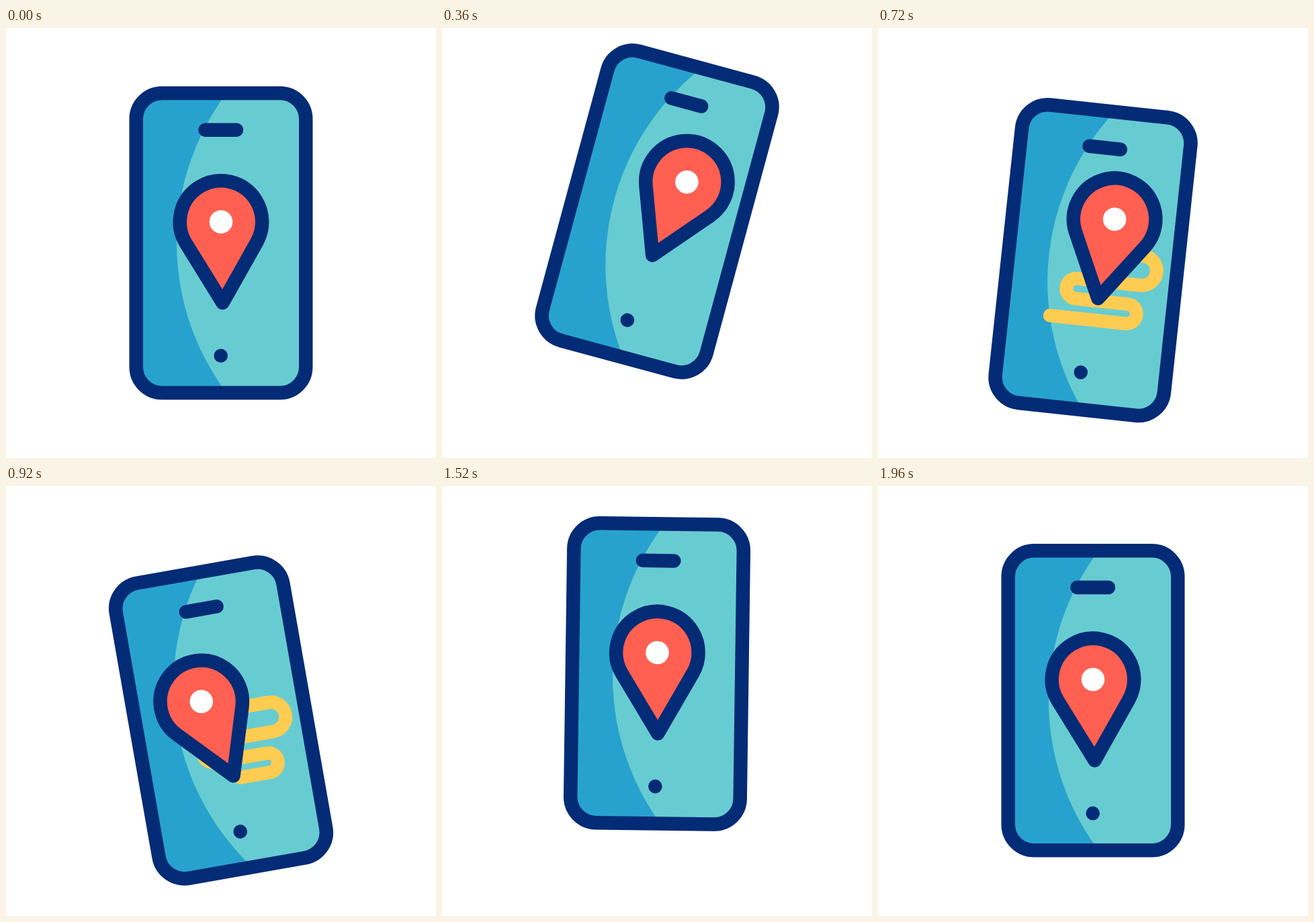
An HTML page with a canvas for the animation above (2000 ms loop, 640 px wide and 640 px high).

```html
<!DOCTYPE html>
<html lang="en">
<head>
<meta charset="utf-8">
<title>Phone with map pin</title>
<style>
html, body { margin: 0; width: 100%; height: 100%; overflow: hidden; background: #fff; }
canvas { display: block; width: 640px; height: 640px; }
</style>
</head>
<body>
<canvas id="stage" width="640" height="640"></canvas>
<script>
const ctx = document.getElementById('stage').getContext('2d');
const NAVY = '#042b76', BLUE = '#27a2ce', TEAL = '#67ccd1';
const RED = '#ff6051', YELLOW = '#ffcc52';
const LOOP = 2000, STEP = 40, LINE = 20.5, TAU = Math.PI * 2;

// Tracks are lists of [ms, value], eased in and out between keys.
const phoneTurn = [[0, 0], [530, 20], [930, -10], [1283, 5], [1600, 0]];
const phoneY = [[0, 320], [313, 272.5], [340, 272.5], [800, 352], [857, 352],
  [1381, 277], [1440, 277], [2000, 320]];
const pinTurn = [[200, 0], [530, 23.5], [930, -12.3], [1220, 9], [1520, 0]];
const pinHop = [[200, 0], [530, 1], [1010, 0]];
const routeHead = [[372, 0], [772, 1]];
const routeTail = [[840, 0], [1200, 1]];

function at(track, t) {
  if (t <= track[0][0]) return track[0][1];
  for (let i = 1; i < track.length; i++) {
    const [t0, a] = track[i - 1], [t1, b] = track[i];
    if (t < t1) {
      const u = (t - t0) / (t1 - t0);
      return a + (b - a) * u * u * (3 - 2 * u);
    }
  }
  return track[track.length - 1][1];
}

const rad = deg => deg * Math.PI / 180;

function disc(x, y, r, color) {
  ctx.beginPath();
  ctx.arc(x, y, r, 0, TAU);
  ctx.fillStyle = color;
  ctx.fill();
}

function stroke(color, width) {
  ctx.strokeStyle = color;
  ctx.lineWidth = width;
  ctx.stroke();
}

function body() {
  ctx.beginPath();
  ctx.roundRect(-126.25, -223, 252.5, 446, 38.5);
}

function screen() {
  ctx.save();
  body();
  ctx.fillStyle = BLUE;
  ctx.fill();
  ctx.clip();
  disc(306, 0, 372, TEAL);
  ctx.restore();
}

// Winding road: bottom line, small bend, left bend, large bend, top line.
const road = { startX: -55, bend1: 58.5, left: -20, bend2: 74, endX: -20 };
const R1 = 14.5, R2 = 15, R3 = 22, BASE = 88.6;
const roadLength = (road.bend1 - road.startX) + (road.bend1 - road.left) +
  (road.bend2 - road.left) + (road.bend2 - road.endX) + Math.PI * (R1 + R2 + R3);

function route(t) {
  const from = at(routeTail, t) * roadLength;
  const to = at(routeHead, t) * roadLength;
  if (to - from < 0.5) return;
  const y1 = BASE - R1, y2 = y1 - R1 - R2, y3 = y2 - R2 - R3;
  const q = Math.PI / 2;
  ctx.beginPath();
  ctx.moveTo(road.startX, BASE);
  ctx.arc(road.bend1, y1, R1, q, -q, true);
  ctx.arc(road.left, y2, R2, q, 3 * q);
  ctx.arc(road.bend2, y3, R3, q, -q, true);
  ctx.lineTo(road.endX, y3 - R3);
  ctx.setLineDash([to - from, 4000]);
  ctx.lineDashOffset = -from;
  stroke(YELLOW, 20);
  ctx.setLineDash([]);
}

// The pin turns about its tip.
function pin(t) {
  const hop = at(pinHop, t), r = 61.2, cx = -2.5, cy = -120.4;
  const axis = Math.atan2(-cy, -cx);
  const half = Math.acos(r / Math.hypot(cx, cy));
  ctx.save();
  ctx.translate(2.5 + 16.7 * hop, 89 - 50.8 * hop);
  ctx.rotate(rad(at(pinTurn, t)));
  ctx.beginPath();
  ctx.moveTo(0, 0);
  ctx.arc(cx, cy, r, axis + half, axis - half + TAU);
  ctx.closePath();
  ctx.fillStyle = RED;
  ctx.fill();
  stroke(NAVY, LINE);
  disc(cx, cy, 17.3, '#fff');
  ctx.restore();
}

function draw(t) {
  ctx.setTransform(1, 0, 0, 1, 0, 0);
  ctx.fillStyle = '#fff';
  ctx.fillRect(0, 0, 640, 640);
  ctx.translate(320, at(phoneY, t));
  ctx.rotate(rad(at(phoneTurn, t)));
  ctx.lineCap = ctx.lineJoin = 'round';

  screen();
  ctx.beginPath();
  ctx.moveTo(-23.5, -168.3);
  ctx.lineTo(23, -168.3);
  stroke(NAVY, LINE);
  disc(-0.3, 167.8, 10.3, NAVY);
  route(t);
  body();
  stroke(NAVY, LINE);
  pin(t);
}

const begin = performance.now();
function tick() {
  const t = (performance.now() - begin) % LOOP;
  draw(Math.floor(t / STEP) * STEP);
  requestAnimationFrame(tick);
}
tick();
</script>
</body>
</html>
```
